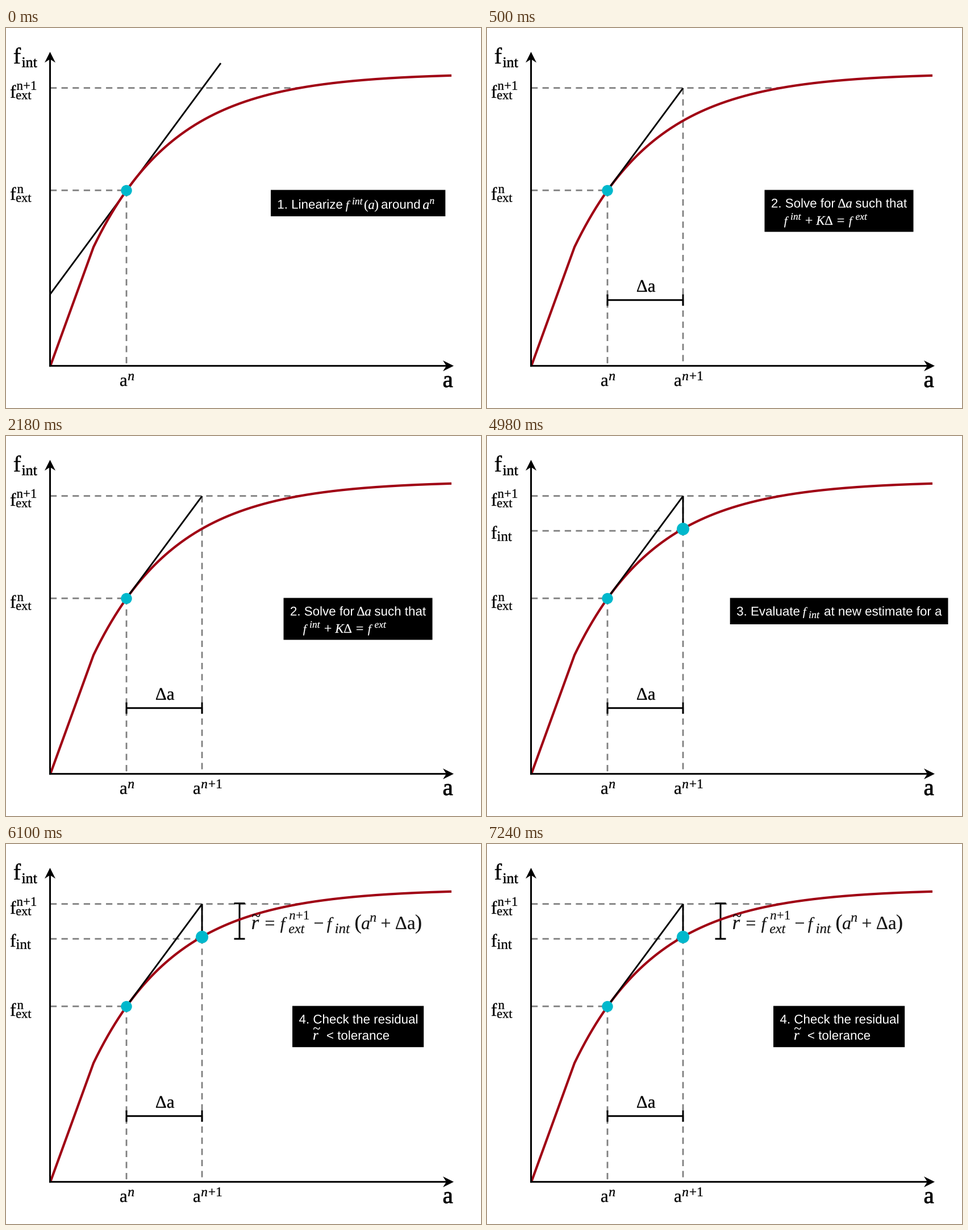
Animation, 836 px wide and 670 px high, one loop 8 s. Source, as a matplotlib script:

```python
import numpy as np
import matplotlib.pyplot as plt
from matplotlib.animation import FuncAnimation
from matplotlib.patches import Circle, PathPatch, Polygon, Rectangle
from matplotlib.path import Path
from matplotlib.textpath import TextPath

W, H, DPI = 836, 670, 100
INTERVAL = 100
STARTS = [0, 500, 3300, 6100]
TOTAL = 8000
ALL = (0, 1, 2, 3)

BLACK, GRAY, RED, CYAN = "#000000", "#808080", "#a00014", "#00b8cc"

fig = plt.figure(figsize=(W / DPI, H / DPI), dpi=DPI, facecolor="white")
ax = fig.add_axes([0, 0, 1, 1])
ax.set_xlim(0, W)
ax.set_ylim(H, 0)
ax.axis("off")

parts = []


def pt(px):
    return px * 72 / DPI


def keep(artist, steps):
    artist.set_snap(False)
    parts.append((artist, steps))


def line(xs, ys, steps=ALL, color=BLACK, width=3.0, z=3, **kw):
    art, = ax.plot(xs, ys, color=color, lw=pt(width), zorder=z,
                   solid_capstyle="butt", dash_capstyle="butt", **kw)
    keep(art, steps)


def dashed(x0, y0, x1, y1, steps=ALL):
    line([x0, x1], [y0, y1], steps, GRAY, 2.8, 1, linestyle=(0, (4, 3)))


def shape(patch, steps=ALL):
    ax.add_patch(patch)
    keep(patch, steps)


def dot(x, y, r, steps):
    shape(Circle((x, y), r, fc=CYAN, ec="none", zorder=6), steps)


def bar(p, q, cap, steps):
    """Dimension line with a flat cap at both ends."""
    (x0, y0), (x1, y1) = p, q
    line([x0, x1], [y0, y1], steps)
    dx, dy = (0, cap) if y0 == y1 else (cap, 0)
    for x, y in (p, q):
        line([x - dx, x + dx], [y - dy, y + dy], steps)


def text(x, y, s, size, steps=ALL, color=BLACK, family="Liberation Serif",
         italic=False, bold=0.3):
    """Text with its ink starting at x and its baseline at y."""
    prop = {"family": family, "style": "italic" if italic else "normal"}
    glyphs = TextPath((0, 0), s, size=size, prop=prop)
    left = glyphs.get_extents().x0
    verts = glyphs.vertices * [1, -1] + [x - left, y]
    shape(PathPatch(Path(verts, glyphs.codes), fc=color, ec=color,
                    lw=pt(bold), zorder=8), steps)


def sans(x, y, s, step):
    text(x, y, s, 22.35, (step,), "white", "Liberation Sans", bold=0)


def math(x, y, s, size, step, color="white", italic=True):
    text(x, y, s, size, (step,), color, italic=italic, bold=0.2)


def box(x0, y0, x1, y1, step):
    shape(Rectangle((x0, y0), x1 - x0, y1 - y0, fc=BLACK, ec="none",
                    zorder=7), (step,))


# Guides
dashed(78, 105.7, 520, 105.7)
dashed(78, 286.2, 212, 286.2)
dashed(212, 286, 212, 596)
dashed(345, 106, 345, 596, (1, 2, 3))
dashed(78, 167.2, 345, 167.2, (2, 3))

# Tangent
line([78, 378], [469, 62], (0,), width=2.9, z=2)
line([212, 345], [286, 106], (1, 2, 3), width=2.9, z=4.5)
line([345, 345], [105.5, 164], (2, 3), width=2.9, z=4.5)

# Response curve: linear part, then exponential saturation
cx = np.linspace(154, 784, 300)
cy = 79.5 + 207 * np.exp(-(cx - 212) / 147.5)
line(np.r_[78, cx], np.r_[596, cy], color=RED, width=4.2, z=4,
     solid_joinstyle="round")

# Axes
line([77.5, 77.5], [597.2, 52], z=5)
line([76, 778], [595.7, 595.7], z=5)
shape(Polygon([(77.5, 42), (87, 61), (77.5, 55), (68, 61)], fc=BLACK, zorder=5, lw=0))
shape(Polygon([(788, 595.7), (769, 586.2), (775, 595.7), (769, 605.2)],
              fc=BLACK, zorder=5, lw=0))

dot(212, 286.5, 9.7, ALL)
dot(345, 164, 11, (2, 3))

# Axis labels
text(14, 62.5, "f", 40, bold=0.5)
text(28, 69, "int", 26, bold=0.5)
text(770, 633, "a", 41, bold=0.9)
text(8, 123, "f", 32)
text(19, 109, "n+1", 23)
text(18, 125.5, "ext", 22.5)
text(8, 303, "f", 32)
text(20, 291, "n", 23)
text(18, 306.5, "ext", 22.5)
text(8, 181, "f", 32, (2, 3))
text(18, 185, "int", 25, (2, 3))
text(201, 631, "a", 31)
text(215, 621, "n", 24, italic=True)
text(330, 631, "a", 31, (1, 2, 3))
text(344, 621, "n", 23.5, (1, 2, 3), italic=True)
text(357, 621, "+1", 23.5, (1, 2, 3))

# Increment
bar((212, 479.7), (345, 479.7), 10, (1, 2, 3))
text(264, 465, "Δa", 31, (1, 2, 3))

# Step 1
box(466, 285.5, 773.3, 332, 0)
sans(479, 318.5, "1. Linearize", 0)
math(598, 319, "f", 21, 0)
math(610, 311, "int", 17.5, 0)
math(631, 319, "(", 23, 0, italic=False)
math(638, 319, "a", 23, 0)
math(649, 319, ")", 23, 0, italic=False)
sans(661, 318.5, "around", 0)
math(734, 319, "a", 24, 0)
math(746, 310, "n", 17.5, 0)

# Step 2
box(488.5, 285.5, 750.5, 359.4, 1)
sans(501, 316.5, "2. Solve for", 1)
math(618, 316.5, "Δ", 23, 1, italic=False)
math(632, 316.5, "a", 23, 1)
sans(649, 316.5, "such that", 1)
math(523, 347, "f", 21, 1)
math(535, 338, "int", 17.5, 1)
math(561, 347, "+", 24, 1, italic=False)
math(579, 347, "K", 23, 1)
math(595, 347, "Δ", 23, 1, italic=False)
math(617, 347, "=", 24, 1, italic=False)
math(637, 347, "f", 21, 1)
math(649, 338, "ext", 17.5, 1)

# Step 3
box(427.7, 285.5, 811.5, 332, 2)
sans(440, 316.5, "3. Evaluate", 2)
math(556, 316.5, "f", 21, 2)
math(567, 321, "int", 18, 2)
sans(594, 316.5, "at new estimate for a", 2)

# Step 4
box(504, 285.5, 735.2, 358.2, 3)
sans(516, 316.5, "4. Check the residual", 3)
math(541, 345, "r", 25, 3)
math(541, 333, "~", 24, 3, italic=False)
sans(565, 345, "< tolerance", 3)

# Residual
INK = "#141414"
bar((411, 104.7), (411, 167.2), 9.5, (3,))
math(433, 150, "r", 35, 3, INK)
math(433, 136, "~", 30, 3, INK, False)
math(457, 150, "=", 32, 3, INK, False)
math(483, 150, "f", 30, 3, INK)
math(499, 133, "n", 23, 3, INK)
math(511, 133, "+1", 23, 3, INK, False)
math(498, 157, "ext", 24, 3, INK)
math(543, 150, "−", 32, 3, INK, False)
math(565, 150, "f", 30, 3, INK)
math(580, 157, "int", 25, 3, INK)
math(615, 150, "(", 37, 3, INK, False)
math(626, 150, "a", 32, 3, INK)
math(641, 137, "n", 24, 3, INK)
math(661, 150, "+", 32, 3, INK, False)
math(686, 150, "Δa", 33, 3, INK, False)
math(721, 150, ")", 37, 3, INK, False)


def draw(i):
    step = sum(i * INTERVAL >= s for s in STARTS) - 1
    for artist, steps in parts:
        artist.set_visible(step in steps)
    return [artist for artist, _ in parts]


anim = FuncAnimation(fig, draw, frames=TOTAL // INTERVAL, interval=INTERVAL,
                     repeat=True, repeat_delay=0, blit=False)
plt.show()
```
